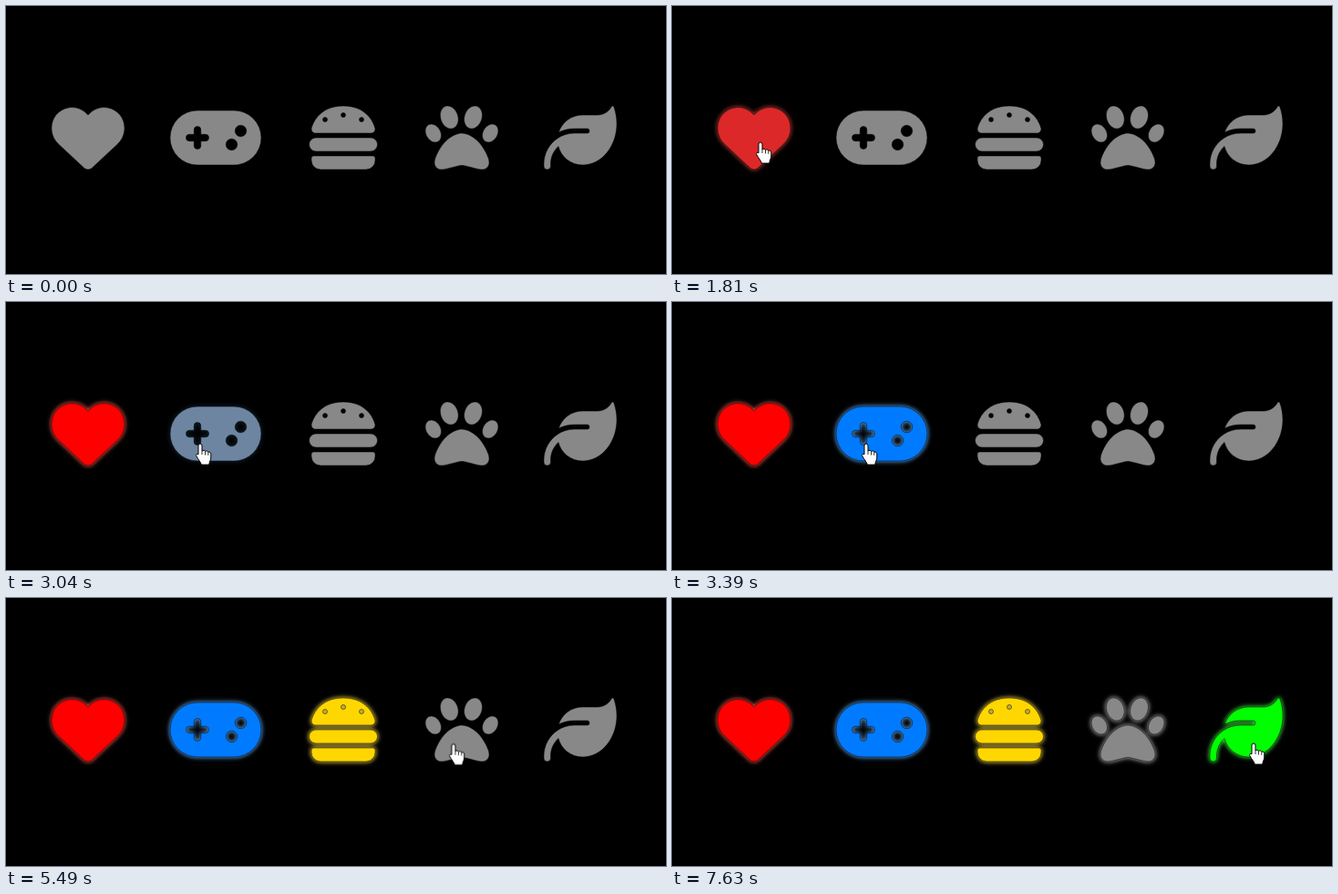
An HTML page that plays this animation: 724 by 295 pixels, repeating every 8000 ms.

```html
<!DOCTYPE html>
<html lang="en">
<head>
<meta charset="utf-8">
<title>Icon glow</title>
<style>
  @property --lit { syntax: "<number>"; inherits: true; initial-value: 0; }

  html, body { margin: 0; width: 100%; height: 100%; overflow: hidden; background: #000; }
  svg { display: block; width: 724px; height: 295px; }

  .icon {
    --lit: 0;
    color: color-mix(in srgb, var(--on) calc(var(--lit) * 100%), #888);
    animation: 8s ease-in-out infinite;
  }
  .glow { fill: var(--halo); stroke: var(--halo); stroke-width: 7; filter: blur(2.4px); opacity: var(--lit); }
  .face { fill: currentColor; stroke: #000; stroke-opacity: .55; stroke-width: 6; }

  .heart  { --on: #f00;    --halo: #ff5a50; animation-name: heart; }
  .pad    { --on: #007bff; --halo: #64b0ff; animation-name: pad; }
  .burger { --on: #ffd700; --halo: #ffe04a; animation-name: burger; }
  .paw    { --on: #888;    --halo: #b4b4b4; animation-name: paw; }
  .leaf   { --on: #0f0;    --halo: #46ff46; animation-name: leaf; }

  @keyframes heart  { 0%, 18.9% { --lit: 0 } 24.9%, 100% { --lit: 1 } }
  @keyframes pad    { 0%, 36.1% { --lit: 0 } 42.3%, 100% { --lit: 1 } }
  @keyframes burger { 0%, 54.2% { --lit: 0 } 60.2%, 100% { --lit: 1 } }
  @keyframes paw    { 0%, 70.9% { --lit: 0 } 76.5%, 100% { --lit: 1 } }
  @keyframes leaf   { 0%, 91.3% { --lit: 0 } 95.4%, 100% { --lit: 1 } }

  .cursor { fill: #fff; stroke: #000; stroke-linejoin: round; animation: move 8s linear infinite; }
  .arrow { animation: arrow 8s step-end infinite; }
  .hand { animation: hand 8s step-end infinite; }

  @keyframes move {
    0%, 9.2% { transform: translate(190px, 310px) }
    10.1% { transform: translate(176px, 275px) }
    15% { transform: translate(108px, 164px); animation-timing-function: ease-out }
    16.75%, 27.6% { transform: translate(97px, 150px) }
    28.5% { transform: translate(122px, 156px) }
    29.4% { transform: translate(139px, 157px); animation-timing-function: ease-out }
    34.75%, 45% { transform: translate(213px, 156px); animation-timing-function: ease-in-out }
    52.5%, 60.1% { transform: translate(359px, 156px); animation-timing-function: ease-in-out }
    70.5% { transform: translate(500px, 161px) }
    71.4%, 79.4% { transform: translate(506px, 161px) }
    81.6% { transform: translate(532px, 162px) }
    89.5% { transform: translate(632px, 161px) }
    90.25%, 100% { transform: translate(638px, 160px) }
  }
  /* The pointer is a hand while it is over an icon. */
  @keyframes hand {
    0%, 28.9%, 48.5%, 64.5%, 82.2% { visibility: hidden }
    14.1%, 31.7%, 50.1%, 66.7%, 86.2%, 100% { visibility: visible }
  }
  @keyframes arrow {
    0%, 28.9%, 48.5%, 64.5%, 82.2% { visibility: visible }
    14.1%, 31.7%, 50.1%, 66.7%, 86.2%, 100% { visibility: hidden }
  }
</style>
</head>
<body>
<svg viewBox="0 0 724 295">
  <defs>
    <path id="heart" d="M48 300L228 469c8 7 18 11 28 11s20-4 28-11L464 300c30-28 48-68 48-109v-6c0-70-50-129-119-141C347 36 301 51 268 84L256 96 244 84c-33-33-79-48-125-40C50 56 0 115 0 185v6c0 41 18 81 48 109z"/>
    <path id="pad" fill-rule="evenodd" d="M192 64a192 192 0 0 0 0 384H448a192 192 0 0 0 0-384zM496 168a40 40 0 1 1 0 80 40 40 0 1 1 0-80zM392 304a40 40 0 1 1 80 0 40 40 0 1 1-80 0zM168 200a24 24 0 0 1 48 0v32h32a24 24 0 0 1 0 48h-32v32a24 24 0 0 1-48 0v-32h-32a24 24 0 0 1 0-48h32z"/>
    <path id="burger" fill-rule="evenodd" d="M61 224c-16 0-29-13-29-29l1-6C38 168 79 32 256 32s218 136 223 157l1 6c0 16-13 29-29 29zM144 128a16 16 0 1 0-32 0 16 16 0 1 0 32 0zM400 128a16 16 0 1 0-32 0 16 16 0 1 0 32 0zM272 96a16 16 0 1 0-32 0 16 16 0 1 0 32 0zM64 256H448a48 48 0 0 1 0 96H64a48 48 0 0 1 0-96zM48 384H464a16 16 0 0 1 16 16v16a64 64 0 0 1-64 64H96a64 64 0 0 1-64-64v-16a16 16 0 0 1 16-16z"/>
    <path id="paw" d="M226 93c15 43 0 86-32 97s-70-16-84-59 0-86 32-97 70 16 84 59zM100 199c19 32 15 70-10 84s-59-1-78-34-15-70 10-84 59 1 78 34zM69 401C122 260 215 224 256 224s134 36 187 177c4 10 5 20 5 31v1c0 26-21 47-47 47-11 0-23-1-34-4l-88-22c-15-4-31-4-46 0l-88 22c-11 3-23 4-34 4-26 0-47-21-47-47v-1c0-11 1-21 5-31zM422 283c-25-14-29-52-10-84s53-48 78-34 29 52 10 84-53 48-78 34zM310 190c-32-11-47-54-32-97s52-70 84-59 47 54 32 97-52 70-84 59z"/>
    <path id="leaf" d="M272 96c-79 0-145 51-168 122 34-17 72-26 112-26h88a16 16 0 0 1 0 32H216c-45 0-86 13-120 36C38 299 0 365 0 440v16a24 24 0 0 0 48 0v-16c0-49 21-92 54-123C122 392 190 448 272 448c133 0 240-131 240-291 0-43-8-84-21-120-3-7-13-7-16 0C456 72 419 96 376 96z"/>
  </defs>

  <g class="icon heart" transform="translate(50 105) scale(.15625)"><use href="#heart" class="glow"/><use href="#heart" class="face"/></g>
  <g class="icon pad" transform="translate(180 105) scale(.15625)"><use href="#pad" class="glow"/><use href="#pad" class="face"/></g>
  <g class="icon burger" transform="translate(330 105) scale(.15625)"><use href="#burger" class="glow"/><use href="#burger" class="face"/></g>
  <g class="icon paw" transform="translate(460 105) scale(.15625)"><use href="#paw" class="glow"/><use href="#paw" class="face"/></g>
  <g class="icon leaf" transform="translate(590 105) scale(.15625)"><use href="#leaf" class="glow"/><use href="#leaf" class="face"/></g>

  <g class="cursor">
    <path class="arrow" d="M0 0V16l3.7-3.5 2.6 6 2.6-1.1-2.5-5.8h5z"/>
    <g class="hand">
      <path d="M-2 2a2 2 0 0 1 4 0v6c1-1 3-1 3.5.5 1-.9 3-.6 3.3.8 1.4-.7 3 .2 3 1.8v4c0 3-1.8 4.5-2 8h-8.5c-.5-2.5-3-5-5.5-9.5-.8-1.6 1-3 2.2-1.8z"/>
      <path fill="none" stroke-width=".8" d="M2 8v4M5.5 8.5v4M8.8 9.3v3.5"/>
    </g>
  </g>
</svg>
<script>
  // Blur is measured in the scaled icon space, so undo the scale.
  const scale = 80 / 512;
  for (const glow of document.querySelectorAll(".glow")) glow.style.filter = `blur(${2.4 / scale}px)`;
</script>
</body>
</html>
```
